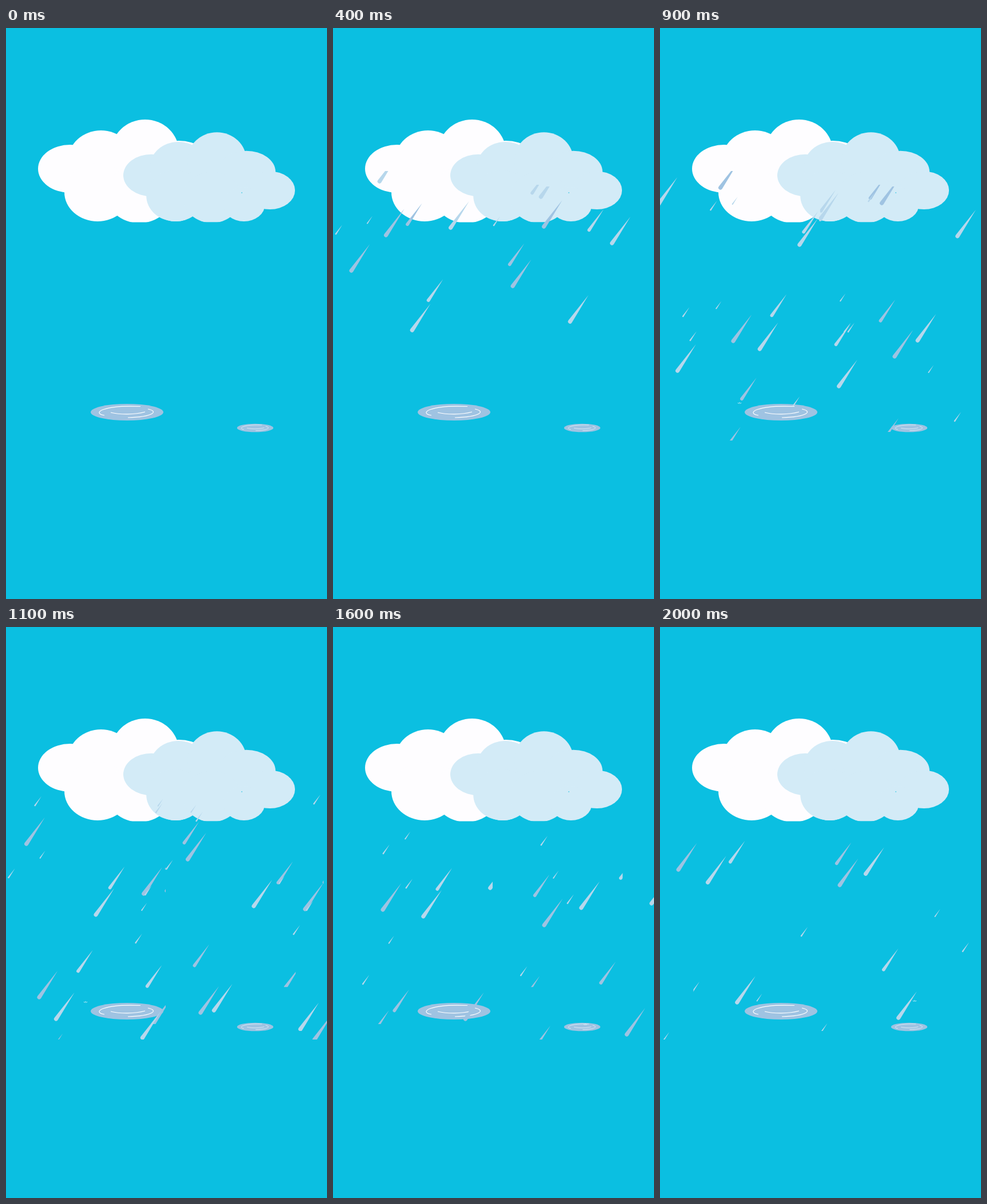
Recreate the animation shown at these times as an HTML page with a canvas. Size 561 px wide and 998 px high, loop 2100 ms.

```html
<!DOCTYPE html>
<html lang="en">
<head>
<meta charset="utf-8">
<title>Rain</title>
<style>
html, body { margin: 0; width: 100%; height: 100%; overflow: hidden; background: #0bbfe1; }
canvas { display: block; }
</style>
</head>
<body>
<canvas id="stage" width="561" height="998"></canvas>
<script>
const ctx = document.getElementById('stage').getContext('2d');
const LOOP = 2100, STEP = 100;
const SKY = '#0bbfe1', LILAC = '#9fc3e2', PALE = '#b7d7ec';
const SLANT = 0.7;   // sideways drift per pixel of fall
const MID = 450;     // height at which the drops are timed

// Lobes of the cloud: centre x, centre y, radius x, radius y
const lobes = [
  [112, 246, 56, 42], [166, 230, 57, 51], [243, 216, 59, 56], [302, 239, 58, 42],
  [349, 276, 50, 38], [160, 287, 58, 51], [233, 290, 58, 51], [297, 304, 42, 34]
];
const ripples = new Path2D(
  'M-39.5 5.5C-62 2-43-13 23.5-10M36.5-5.5C55-2 48 8 1.5 9.5M-28.5.5C-12 4.5 14 4.5 31.5-.5'
);

// Each sheet of rain is shown three times: dx, dy, scale, bottom edge.
// Its large drops are given by the time and x at which they pass MID.
const sheets = [
  {
    left: -4, top: 250, speed: 0.5, colors: [LILAC, LILAC, PALE],
    copies: [[0, 0, 1, 694], [282, 27, 1, 694], [283, 74, 0.8, 694]],
    passes: [
      [452, 14], [706, 196], [602, 135], [612, 428], [1242, -14], [764, -46],
      [1068, 252], [1512, 118], [1186, -102], [1130, 396], [2052, 14], [1588, 279]
    ],
    small: { count: 6, every: 260, phase: 460 }
  },
  {
    left: 3, top: 265, speed: 0.62, colors: [PALE, PALE, LILAC],
    copies: [[0, 0, 1, 721], [276, -15, 1, 721], [56, 53.5, 0.8, 834]],
    passes: [
      [274, 193], [721, 252], [542, 31], [1015, 194], [668, 426], [427, 314],
      [1510, 197], [2006, 81], [1082, 289]
    ],
    small: { count: 7, every: 190, phase: 22 }
  }
];

const splashSpots = [[139, 656], [218, 668], [441, 695], [445, 654]];

function ellipse(x, y, rx, ry) {
  ctx.beginPath();
  ctx.ellipse(x, y, rx, ry, 0, 0, 7);
  ctx.fill();
}

// The cloud is scaled about its lower left corner.
function cloud(x, scale, color) {
  ctx.save();
  ctx.translate(x, 338);
  ctx.scale(scale, scale);
  ctx.translate(-56, -338);
  ctx.beginPath();
  ctx.rect(0, 0, 399, 339.5);
  ctx.clip();
  ctx.fillStyle = color;
  ctx.fillRect(110, 220, 210, 80);
  lobes.forEach(lobe => ellipse(...lobe));
  ctx.fillStyle = SKY;
  ctx.fillRect(292, 280, 1.5, 1.5);
  ctx.restore();
}

function puddle(x, y, scale) {
  ctx.save();
  ctx.translate(x, y);
  ctx.scale(scale, scale);
  ctx.fillStyle = LILAC;
  ellipse(0, 0, 63.5, 14.5);
  ctx.strokeStyle = '#fff';
  ctx.lineWidth = 1.2;
  ctx.stroke(ripples);
  ctx.restore();
}

function drop(x, y, size, color) {
  const turn = Math.atan2(SLANT, 1);
  ctx.fillStyle = color;
  ctx.beginPath();
  ctx.moveTo(x + 32 * size, y - 46 * size);
  ctx.arc(x, y, 3.6 * size, turn, turn + Math.PI);
  ctx.fill();
}

function fall(dt, x, speed, size, color) {
  const dy = dt * speed;
  drop(x - SLANT * dy, MID + dy, size, color);
}

function rain({ left, top, speed, colors, copies, passes, small }, t) {
  for (const [dx, dy, scale, bottom] of copies) {
    ctx.save();
    ctx.translate(dx, dy);
    ctx.scale(scale, scale);
    ctx.beginPath();
    ctx.rect(left, top, 279 - left, bottom - top);
    ctx.clip();
    passes.forEach(([at, x], i) => fall(t - at, x, speed, 1, colors[i % 3]));
    for (let i = 0; i < small.count; i++) {
      const x = (small.phase + i * 178) % 480 - 80;
      fall(t - 550 - i * small.every, x, 0.6, 0.35, PALE);
    }
    ctx.restore();
  }
}

function splash(x, y) {
  ctx.strokeStyle = '#e6f5fc';
  ctx.lineWidth = 1;
  ctx.beginPath();
  for (const side of [-1, 0, 1]) {
    ctx.moveTo(x + side * 1.5, y + 0.5);
    ctx.lineTo(x + side * 3, y - 2 + Math.abs(side));
  }
  ctx.stroke();
}

function draw(now) {
  const t = Math.floor(now % LOOP / STEP) * STEP;
  ctx.fillStyle = SKY;
  ctx.fillRect(0, 0, 561, 998);
  cloud(56, 1, '#fefdff');
  cloud(205, 0.875, '#d3ebf7');
  puddle(211.5, 671.5, 1);
  puddle(435.5, 699, 0.5);
  if (t > 0) sheets.forEach(sheet => rain(sheet, t));
  if (t >= 900) splash(...splashSpots[Math.floor((t - 900) / 300)]);
}

const start = performance.now();
function tick() {
  draw(performance.now() - start);
  requestAnimationFrame(tick);
}
tick();
</script>
</body>
</html>
```
